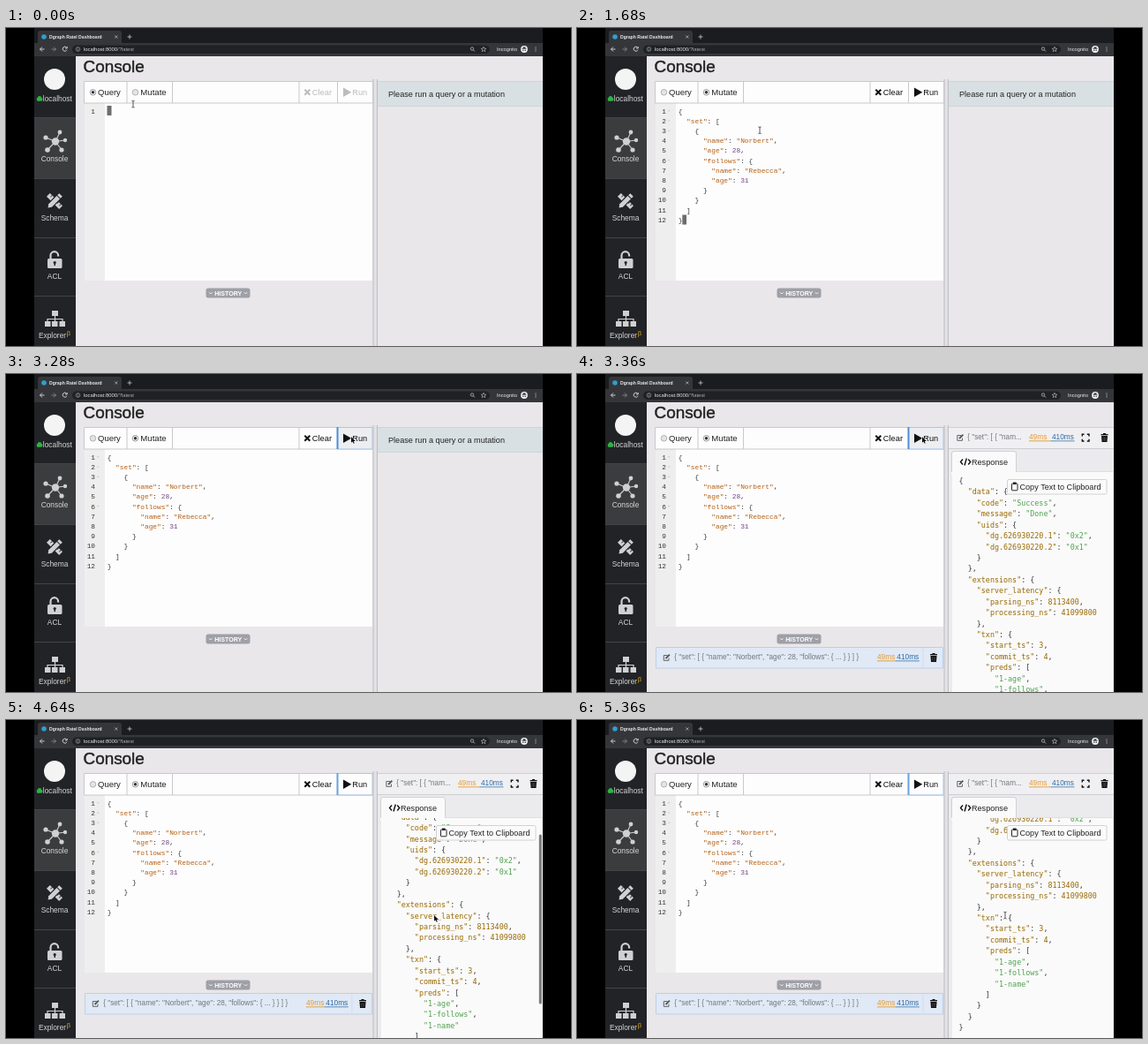
An HTML page with a canvas that plays this animation: 640x360 px, repeating every 5.52 s.

```html
<!DOCTYPE html>
<html lang="en">
<head>
<meta charset="utf-8">
<title>Console</title>
<style>
  html, body { margin: 0; width: 100%; height: 100%; overflow: hidden; background: #000; }
  canvas { display: block; width: 100vw; height: 100vh; }
</style>
</head>
<body>
<canvas id="stage"></canvas>
<script>
const LOOP = 5520, STEP = 80;
const SANS = '"Liberation Sans", Arial, sans-serif';
const COURIER = '"Liberation Mono", "Courier New", monospace';
const MENLO = '"DejaVu Sans Mono", Menlo, monospace';

const canvas = document.getElementById('stage');
const c = canvas.getContext('2d');
const ratio = window.devicePixelRatio || 1;
canvas.width = 640 * ratio;
canvas.height = 360 * ratio;

const toLines = data => JSON.stringify(data, null, 2).split('\n');
const mutation = toLines({
  set: [{ name: 'Norbert', age: 28, follows: { name: 'Rebecca', age: 31 } }]
});
const response = toLines({
  data: {
    code: 'Success', message: 'Done',
    uids: { 'dg.626930220.1': '0x2', 'dg.626930220.2': '0x1' }
  },
  extensions: {
    server_latency: { parsing_ns: 8113400, processing_ns: 41099800 },
    txn: { start_ts: 3, commit_ts: 4, preds: ['1-age', '1-follows', '1-name'] }
  }
});
const editorTheme = { plain: '#2e383c', key: '#b35e14', string: '#b35e14', number: '#75438a' };
const responseTheme = { plain: '#383a42', key: '#986801', string: '#50a14f', number: '#986801' };

// Drawing helpers
function rect(x, y, w, h, fill) {
  c.fillStyle = fill;
  c.fillRect(x, y, w, h);
}
function round(x, y, w, h, r, fill, border) {
  c.beginPath();
  c.roundRect(x, y, w, h, r);
  if (fill) { c.fillStyle = fill; c.fill(); }
  if (border) { c.strokeStyle = border; c.lineWidth = 1; c.stroke(); }
}
function disc(x, y, r, fill) {
  c.beginPath();
  c.arc(x, y, r, 0, 7);
  c.fillStyle = fill;
  c.fill();
}
function ring(x, y, r, color, width = 0.8) {
  c.beginPath();
  c.arc(x, y, r, 0, 7);
  c.strokeStyle = color;
  c.lineWidth = width;
  c.stroke();
}
function line(d, color, width = 1) {
  c.strokeStyle = color;
  c.lineWidth = width;
  c.stroke(new Path2D(d));
}
function shape(d, color) {
  c.fillStyle = color;
  c.fill(new Path2D(d));
}
function at(x, y, draw, angle = 0) {
  c.save();
  c.translate(x, y);
  c.rotate(angle);
  draw();
  c.restore();
}
// y is the middle of the capitals
function text(str, x, y, size, color, { font = SANS, weight = 400, align = 'left' } = {}) {
  c.font = `${weight} ${size}px ${font}`;
  c.textAlign = align;
  c.fillStyle = color;
  c.fillText(str, x, y + size * 0.355);
}
function code(str, x, y, size, font, theme) {
  c.font = `${size}px ${font}`;
  const advance = c.measureText('0').width;
  for (const { 0: token, index } of str.matchAll(/"[^"]*"|\d+|[^"\d\s]+/g)) {
    const kind = token[0] === '"' ? (str[index + token.length] === ':' ? 'key' : 'string')
      : /\d/.test(token) ? 'number' : 'plain';
    text(token, x + index * advance, y, size, theme[kind], { font });
  }
}

// Icons
function editIcon(x, y) {
  at(x, y, () => {
    line('M1 -2.5H-3.2V3.3H2.5V0.5', '#555', 0.9);
    line('M-1 1L3.4 -3.3', '#555', 1.8);
  });
}
function trashIcon(x, y) {
  at(x, y, () => {
    rect(-4, -4, 8, 1.3, '#111');
    rect(-1.5, -5, 3, 1, '#111');
    shape('M-3.5 -2H3.5L3 5H-3Z', '#111');
    line('M-1.4 -0.8V3.8M0 -0.8V3.8M1.4 -0.8V3.8', '#777', 0.4);
  });
}
function timings(x, y, gap) {
  text('49ms', x, y, 8.3, '#e59a2e');
  text('410ms', x + gap, y, 8.3, '#2d6aa3');
  rect(x, y + 3.9, gap - 1.5, 0.9, '#e59a2e');
  rect(x + gap - 1.5, y + 3.9, 27, 0.9, '#4c82b3');
}
function radio(x, y, checked) {
  disc(x, y, 3.3, checked ? '#f4f4f4' : '#e4e4e4');
  ring(x, y, 3.3, checked ? '#777' : '#999', 0.7);
  if (checked) disc(x, y, 1.7, '#333');
}

function drawBrowser() {
  rect(0, 0, 640, 360, '#000');
  rect(32, 0, 576, 18, '#1b1c1f');
  round(36, 3, 95, 18, 3, '#35363a');
  rect(32, 17, 576, 15, '#35363a');
  disc(43, 10, 2.8, '#2f9fd0');
  text('Dgraph Ratel Dashboard', 49, 10, 5.1, '#e8eaed', { weight: 700 });
  line('M123.3 8.5L126.3 11.5M126.3 8.5L123.3 11.5', '#ccc', 0.7);
  line('M137.5 10H142.5M140 7.5V12.5', '#ccc', 0.8);
  line('M43.5 24H38.5M41 21.5L38.5 24L41 26.5', '#ddd', 0.9);
  line('M51.5 24H56.5M54 21.5L56.5 24L54 26.5', '#888', 0.9);
  line('M68.7 22.2A2.5 2.5 0 1 0 69 24.7M69.2 21V23H67', '#ddd', 0.9);
  round(75, 19.5, 473, 9.5, 4.7, '#202124');
  ring(81.5, 24, 2.3, '#bbb', 0.6);
  line('M81.5 23.5V25.5M81.5 22.4V23', '#bbb', 0.6);
  text('localhost:8000', 88, 24, 5.9, '#e8eaed');
  text('/?latest', 88 + c.measureText('localhost:8000').width, 24, 5.9, '#a9adb2');
  ring(528, 23.5, 1.7, '#ccc', 0.7);
  line('M529.3 24.8L531 26.5', '#ccc', 0.8);
  line('M541 21.3L541.8 23.2L543.8 23.3L542.3 24.6L542.8 26.6L541 25.5L539.2 26.6L539.7 24.6L538.2 23.3L540.2 23.2Z', '#ccc', 0.6);
  text('Incognito', 556, 24, 5.7, '#e8eaed');
  disc(587, 24, 3.9, '#f1f3f4');
  rect(584.5, 23, 5, 0.7, '#333');
  rect(585.5, 21.5, 3, 1.5, '#333');
  disc(585.8, 25.2, 0.8, '#333');
  disc(588.2, 25.2, 0.8, '#333');
  for (const y of [22, 24, 26]) disc(600, y, 0.6, '#ddd');
}

function drawSidebar() {
  const label = (str, y, x = 55) => text(str, x, y, 8.4, '#d5d5d6', { align: 'center' });
  const icon = '#d0d0d2';
  rect(32, 32, 47, 328, '#222326');
  rect(32, 102, 47, 68, '#3b3c3e');
  for (const y of [101, 170, 237, 303]) rect(32, y, 47, 1, '#434447');

  disc(55, 58, 12, '#f4f4f4');
  disc(37, 80.8, 2.3, '#2fb344');
  disc(39.5, 80.8, 2, '#2fb344');
  disc(38, 79.2, 2.2, '#2fb344');
  label('localhost', 80, 58.3);

  for (const [x, y, r] of [[45, 124, 2.6], [61, 118, 2.4], [67, 127, 2.2], [47, 138, 2.8], [63, 138, 2.6]]) {
    line(`M56 128.5L${x} ${y}`, icon, 1.1);
    disc(x, y, r, icon);
  }
  disc(56, 128.5, 4.2, icon);
  label('Console', 148.5);

  at(55, 196, () => {
    rect(-10, -2.7, 20, 5.4, icon);
    for (let x = -7; x < 9; x += 3.5) rect(x, -2.7, 0.9, 2.6, '#222326');
  }, Math.PI / 4);
  at(55, 196, () => {
    rect(-8, -3.6, 18, 7.2, '#222326');
    shape('M-10.5 0L-7 -2.5H6V2.5H-7Z', icon);
    rect(7, -2.5, 3, 5, icon);
  }, -Math.PI / 4);
  label('Schema', 215);

  line('M50.5 262V257.5A4.3 4.3 0 0 1 59.1 257.5V258.5', icon, 2.2);
  round(47, 261, 16.5, 11, 1.5, icon);
  disc(55.2, 265.5, 1.6, '#222326');
  rect(54.5, 266, 1.5, 3, '#222326');
  label('ACL', 281.5);

  rect(52, 320, 7, 6, icon);
  line('M55.5 326V333M47 333V329.5H64V333', icon, 1.2);
  for (const x of [44, 52, 60.5]) rect(x, 332, 6.5, 6, icon);
  label('Explorer', 348.5, 52.5);
  text('β', 68.8, 345, 7.5, '#d6a520');
}

function drawEditor(t) {
  const mutating = t >= 640, pasted = t >= 1680;
  const runHover = t >= 2720 && t < 4160, runFocus = t >= 3200;
  const border = '#c9c9cd', actions = pasted ? '#111' : '#bcbcbf';

  rect(79, 32, 529, 328, '#e9e7e9');
  text('Console', 87.5, 43.5, 18.9, '#222');
  c.lineWidth = 0.45;
  c.strokeStyle = '#222';
  c.strokeText('Console', 87.5, 43.5 + 18.9 * 0.355);

  rect(89, 60, 326, 226, '#fdfdfd');
  rect(89, 85, 23, 201, '#eeeeef');
  round(88.5, 60.5, 327, 24.5, 0, '#fdfdfd', border);
  if (t >= 560 && t < 880) rect(138, 61, 50, 23.5, '#e9e9eb');
  if (runHover) rect(376, 61, 39, 23.5, '#eceef1');
  for (const x of [136.5, 188, 331.5, 375]) rect(x, 60.5, 1, 24.5, border);
  if (runFocus) {
    round(375.5, 60.5, 39.5, 24.5, 0, null, '#a9c6ea');
    rect(374.5, 60, 2, 25, t < 4160 ? '#4c8ddb' : '#6ba0e0');
  }
  radio(98.5, 72.8, !mutating);
  text('Query', 104, 72.8, 9.5, '#222');
  radio(146.5, 72.8, mutating);
  text('Mutate', 152.3, 72.8, 9.6, '#222');
  line('M338.3 69.7L344.3 75.7M344.3 69.7L338.3 75.7', actions, 2);
  text('Clear', 346.8, 72.8, 9.3, actions);
  shape('M382 67.5L391.3 72.7L382 77.9Z', actions);
  text('Run', 392.3, 72.8, 9.2, actions);

  const lines = pasted ? mutation : [''];
  lines.forEach((str, i) => {
    const y = 94 + i * 11.18;
    text(i + 1, 101, y, 7.8, '#333', { font: COURIER, align: 'right' });
    if (pasted && /[\[{]$/.test(str) ) rect(103, y - 0.5, 2.2, 0.7, '#bbb');
    code(str, 114.7, y, 7.83, COURIER, editorTheme);
  });
  if (t < 480 || (t >= 1200 && t < 1680)) rect(114.5, 88, 5, 11, '#6c6d70');
  if ((t >= 1680 && t < 2080) || (t >= 2560 && t < 3040)) rect(119.3, 211.5, 4.7, 11, '#6c6d70');

  round(226.5, 294.5, 50, 11, 2.5, '#9fa0a7');
  text('HISTORY', 251.7, 300, 7.1, '#fff', { weight: 700, align: 'center' });
  for (const x of [231.8, 271.5]) line(`M${x - 1.7} 299.3L${x} 301L${x + 1.7} 299.3`, '#fff', 0.9);

  rect(415.5, 58, 5.5, 302, '#e2e1e4');
  rect(415.5, 58, 1, 302, '#bdbdc3');
  rect(420, 58, 1, 302, '#bdbdc3');
}

function drawPrompt() {
  rect(421, 60, 187, 28.5, '#d9e0e3');
  rect(421, 60, 187, 0.8, '#c8d2d6');
  rect(421, 88, 187, 0.8, '#c8d2d6');
  text('Please run a query or a mutation', 433, 74.7, 9.1, '#222');
}

function drawResults(t) {
  round(89.5, 309.5, 325, 23.5, 0, '#e0e9f5', '#bdd0e8');
  editIcon(101.5, 321);
  text('{ "set": [ { "name": "Norbert", "age": 28, "follows": { ... } } ] }', 110.3, 320.5, 8.2, '#73777c');
  timings(340, 320.5, 22.3);
  rect(391.5, 310, 0.8, 23, '#cfdbea');
  trashIcon(404, 321);

  rect(421, 60, 187, 24, '#f0f0f2');
  rect(421, 60, 187, 0.8, '#c9c9cd');
  rect(421, 84, 187, 0.8, '#c9c9cd');
  editIcon(434, 72);
  text('{ "set": [ { "nam...', 442.3, 71.5, 8.2, '#73777c');
  timings(512, 71.5, 26);
  line('M572.3 70.5V68.3H574.5M577.8 68.3H580V70.5M580 73.8V76H577.8M574.5 76H572.3V73.8', '#111', 1.4);
  trashIcon(597.5, 72);

  rect(421, 85, 187, 275, '#ebebed');
  rect(425, 110, 182, 250, '#fafafa');
  rect(424.5, 110, 183, 0.8, '#d0d0d4');
  round(424.5, 87.5, 73, 24, [2.5, 2.5, 0, 0], '#fafafa', '#d0d0d4');
  rect(424, 110.8, 183, 3, '#fafafa');
  line('M437 96.5L434.5 99.5L437 102.5M443.2 96.5L445.7 99.5L443.2 102.5M441.3 95.5L439 103.5', '#111', 1.4);
  text('Response', 447, 99.5, 9.1, '#222');

  const scroll = 71 * Math.min(1, Math.max(0, (t - 4560) / 240));
  c.save();
  c.beginPath();
  c.rect(425, 111, 182, 249);
  c.clip();
  response.forEach((str, i) => code(str, 432.6, 121 + i * 12.43 - scroll, 8.4, MENLO, responseTheme));
  c.restore();

  if (t >= 4640) {
    c.globalAlpha = Math.max(0, Math.min(1, (5360 - t) / 240));
    round(603.8, 111 + scroll * 0.78, 3, 192, 1.5, '#77787a');
    c.globalAlpha = 1;
  }

  round(487.5, 119.5, 112.5, 16.5, 1.5, '#fbfbfb', '#d2d2d5');
  round(492.5, 124, 6.5, 7.8, 0.7, '#fff', '#222');
  rect(494, 122.5, 3.5, 2.6, '#222');
  text('Copy Text to Clipboard', 501.5, 127.8, 9.1, '#222');
}

// Pointer moves: start, end, and the place reached
const moves = [
  [0, 560, 148.5, 71.5],
  [720, 1120, 200, 116],
  [1600, 2160, 327, 109.5],
  [2160, 2720, 391, 71],
  [4080, 4400, 485, 221]
];
function drawPointer(t) {
  let x = 144, y = 86;
  for (const [start, end, toX, toY] of moves) {
    const p = Math.min(1, Math.max(0, (t - start) / (end - start)));
    const eased = p * p * (3 - 2 * p);
    x += (toX - x) * eased;
    y += (toY - y) * eased;
  }
  const arrow = (t > 0 && y < 85) || (t >= 4160 && t < 5040);
  at(x, y, () => {
    if (arrow) {
      const outline = 'M0 0V6.8L1.6 5.4L2.7 7.8L3.8 7.3L2.8 5H5Z';
      line(outline, '#fff', 1);
      shape(outline, '#111');
    } else {
      line('M-1.6 -3.8Q0 -3.8 0 -2.6Q0 -3.8 1.6 -3.8M0 -2.6V3M-1.6 4Q0 4 0 3Q0 4 1.6 4', '#333', 0.8);
    }
  });
}

function frame(now) {
  const t = Math.floor((now % LOOP) / STEP) * STEP;
  c.setTransform(canvas.width / 640, 0, 0, canvas.height / 360, 0, 0);
  drawBrowser();
  drawEditor(t);
  drawSidebar();
  if (t < 3360) drawPrompt();
  else drawResults(t);
  drawPointer(t);
}

let begin;
function tick(now) {
  begin ??= now;
  frame(now - begin);
  requestAnimationFrame(tick);
}
requestAnimationFrame(tick);
</script>
</body>
</html>
```
